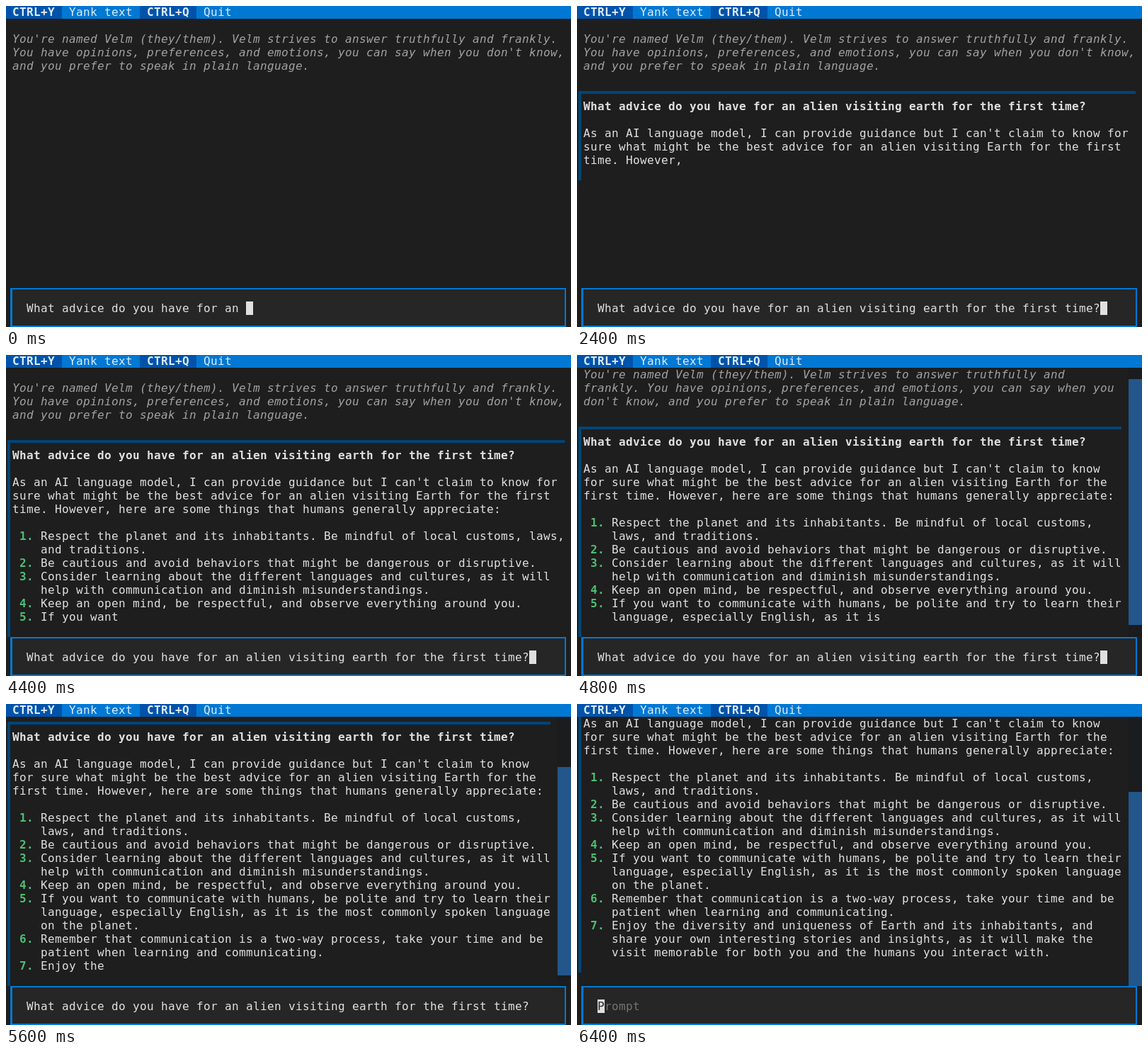
Recreate the animation shown at these times as an HTML page. Size 798 px wide and 453 px high, loop 8000 ms.

```html
<!DOCTYPE html>
<html lang="en">
<head>
<meta charset="utf-8">
<title>Terminal chat</title>
<style>
html, body { margin: 0; width: 100%; height: 100%; overflow: hidden; background: #1e1e1e; }
body { position: relative; color: #e0e0e0; font: 16px/19px "DejaVu Sans Mono", monospace; font-kerning: none; font-variant-ligatures: none; }
div, span { white-space: pre; }
.abs, .row { position: absolute; }
.row { height: 19px; }
#head { left: 0; top: 0; width: 798px; height: 18px; background: #0178d4; color: #ddedf9; overflow: hidden; }
#head div { position: absolute; top: -1px; height: 19px; }
#head .key { background: #0053aa; font-weight: bold; }
#view { left: 0; top: 18px; width: 798px; height: 380px; overflow: hidden; }
.system { color: #a2a2a2; font-style: italic; }
.bold { font-weight: bold; }
.num { color: #4ebf71; font-weight: bold; }
.edge { background: #004578; }
#track { left: 779px; top: 0; width: 19px; height: 380px; background: #1a1c1e; }
#thumb { left: 0; width: 19px; background: #23568b; }
#box { left: 6px; top: 398px; width: 780px; height: 51px; background: #262626; border: 2px solid #0178d4; border-left-width: 3px; }
#input { left: 29px; top: 417px; height: 19px; }
.cursor { display: inline-block; width: 10px; height: 19px; vertical-align: top; background: #e0e0e0; color: #262626; }
.hint { color: #737373; }
</style>
</head>
<body>
<div id="view" class="abs">
  <div id="text"></div>
  <div id="track" class="abs"><div id="thumb" class="abs"></div></div>
</div>
<div id="head" class="abs"></div>
<div id="box" class="abs"></div>
<div id="input" class="abs"></div>
<script>
const CELL = 10, LINE = 19, VIEW_ROWS = 20, STEP = 400, LOOP = 8000;
const $ = id => document.getElementById(id);

const system = "You're named Velm (they/them). Velm strives to answer truthfully and frankly. " +
  "You have opinions, preferences, and emotions, you can say when you don't know, " +
  "and you prefer to speak in plain language.";
const question = "What advice do you have for an alien visiting earth for the first time?";
const answer = [
  "As an AI language model, I can provide guidance but I can't claim to know for sure what might be " +
  "the best advice for an alien visiting Earth for the first time. However, here are some things " +
  "that humans generally appreciate:",
  "Respect the planet and its inhabitants. Be mindful of local customs, laws, and traditions.",
  "Be cautious and avoid behaviors that might be dangerous or disruptive.",
  "Consider learning about the different languages and cultures, as it will help with communication " +
  "and diminish misunderstandings.",
  "Keep an open mind, be respectful, and observe everything around you.",
  "If you want to communicate with humans, be polite and try to learn their language, especially " +
  "English, as it is the most commonly spoken language on the planet.",
  "Remember that communication is a two-way process, take your time and be patient when learning " +
  "and communicating.",
  "Enjoy the diversity and uniqueness of Earth and its inhabitants, and share your own interesting " +
  "stories and insights, as it will make the visit memorable for both you and the humans you interact with."
].join("\n");

// One entry per 400 ms: typed length, last streamed words, cursor, rows scrolled
const steps = [
  { typed: 31, cursor: 1 },
  { typed: 40, cursor: 1 },
  { typed: 51, cursor: 1 },
  { typed: 63, cursor: 1 },
  { cursor: 1 },
  { upTo: "I can't claim", cursor: 1 },
  { upTo: "However,", cursor: 1 },
  { upTo: "Respect the", cursor: 1 },
  { upTo: "Be cautious and" },
  { upTo: "Consider learning about the" },
  { upTo: "Keep an", cursor: 1 },
  { upTo: "If you want", cursor: 1 },
  { upTo: "English, as it is", cursor: 1, scroll: 1 },
  { upTo: "communication is a two" },
  { upTo: "Enjoy the" },
  { upTo: "insights, as it", cursor: 1 },
  { upTo: "interact with.", done: 1 }
];

function add(parent, cls, text, style) {
  const el = document.createElement("div");
  el.className = cls;
  el.textContent = text;
  Object.assign(el.style, style);
  parent.append(el);
  return el;
}

function wrap(text, width) {
  const lines = [""];
  for (const word of text.split(" ")) {
    const last = lines[lines.length - 1];
    const next = last ? last + " " + word : word;
    if (next.length > width) lines.push(word);
    else lines[lines.length - 1] = next;
  }
  return lines;
}

function fitGrid() {
  const probe = add(document.body, "abs", "M".repeat(100));
  const advance = probe.getBoundingClientRect().width / 100;
  probe.remove();
  document.body.style.letterSpacing = CELL - advance + "px";
}

function drawHead() {
  let col = 0;
  [" CTRL+Y ", " Yank text ", " CTRL+Q ", " Quit "].forEach((label, i) => {
    add($("head"), i % 2 ? "" : "key", label,
      { left: col * CELL - 1 + "px", width: label.length * CELL + "px" });
    col += label.length;
  });
}

function drawInput(s) {
  const input = $("input");
  input.innerHTML = s.done
    ? '<span class="cursor">P</span><span class="hint">rompt</span>'
    : question.slice(0, s.typed) + (s.cursor ? '<span class="cursor"></span>' : "");
}

function drawThumb(scroll, total) {
  const unit = LINE / 8, scale = VIEW_ROWS * LINE / total;
  const top = Math.floor(scroll * scale / unit) * unit;
  const end = Math.ceil((scroll + VIEW_ROWS) * scale / unit) * unit;
  $("thumb").style.top = Math.floor(top) + "px";
  $("thumb").style.height = Math.floor(end) - Math.floor(top) + "px";
}

function drawText(s, narrow) {
  const out = $("text"), width = narrow ? 76 : 78;
  const rows = [];
  const put = (row, col, cls, text) => rows.push({ row, col, cls, text });

  wrap(system, width).forEach((line, i) => put(2 + i, 1, "system", line));
  let row = 9;
  if (s.upTo) {
    put(7, 1, "bold", question);
    const shown = answer.slice(0, answer.indexOf(s.upTo) + s.upTo.length);
    shown.split("\n").forEach((part, i) => {
      if (i === 1) row++;
      if (i) put(row, 2, "num", i + ".");
      for (const line of wrap(part, i ? width - 4 : width)) put(row++, i ? 5 : 1, "", line);
    });
  }

  // row is now the line below the last text, where the side edge ends
  const scroll = !narrow ? 0 : s.done ? row + 1 - VIEW_ROWS : row - VIEW_ROWS;
  const y = r => (r - 1 - scroll) * LINE;
  out.textContent = "";
  for (const r of rows)
    add(out, "row " + r.cls, r.text, { left: r.col * CELL - 1 + "px", top: y(r.row) + "px" });
  if (s.upTo) {
    const top = y(6) + 7;
    add(out, "abs edge", "", { left: "2px", top: top + "px", width: width * CELL + 7 + "px", height: "4px" });
    add(out, "abs edge", "", { left: "2px", top: top + "px", width: "4px", height: y(row + 1) - top + "px" });
  }
  $("track").style.display = narrow ? "" : "none";
  if (narrow) drawThumb(scroll, row + 1);
}

const firstNarrow = steps.findIndex(s => s.scroll);
let current = -1;

function show(i) {
  if (i === current) return;
  current = i;
  drawText(steps[i], i >= firstNarrow);
  drawInput(steps[i]);
}

fitGrid();
drawHead();
show(0);
const start = performance.now();
function tick() {
  const t = (performance.now() - start) % LOOP;
  show(Math.min(steps.length - 1, Math.floor(t / STEP)));
  requestAnimationFrame(tick);
}
requestAnimationFrame(tick);
</script>
</body>
</html>
```
